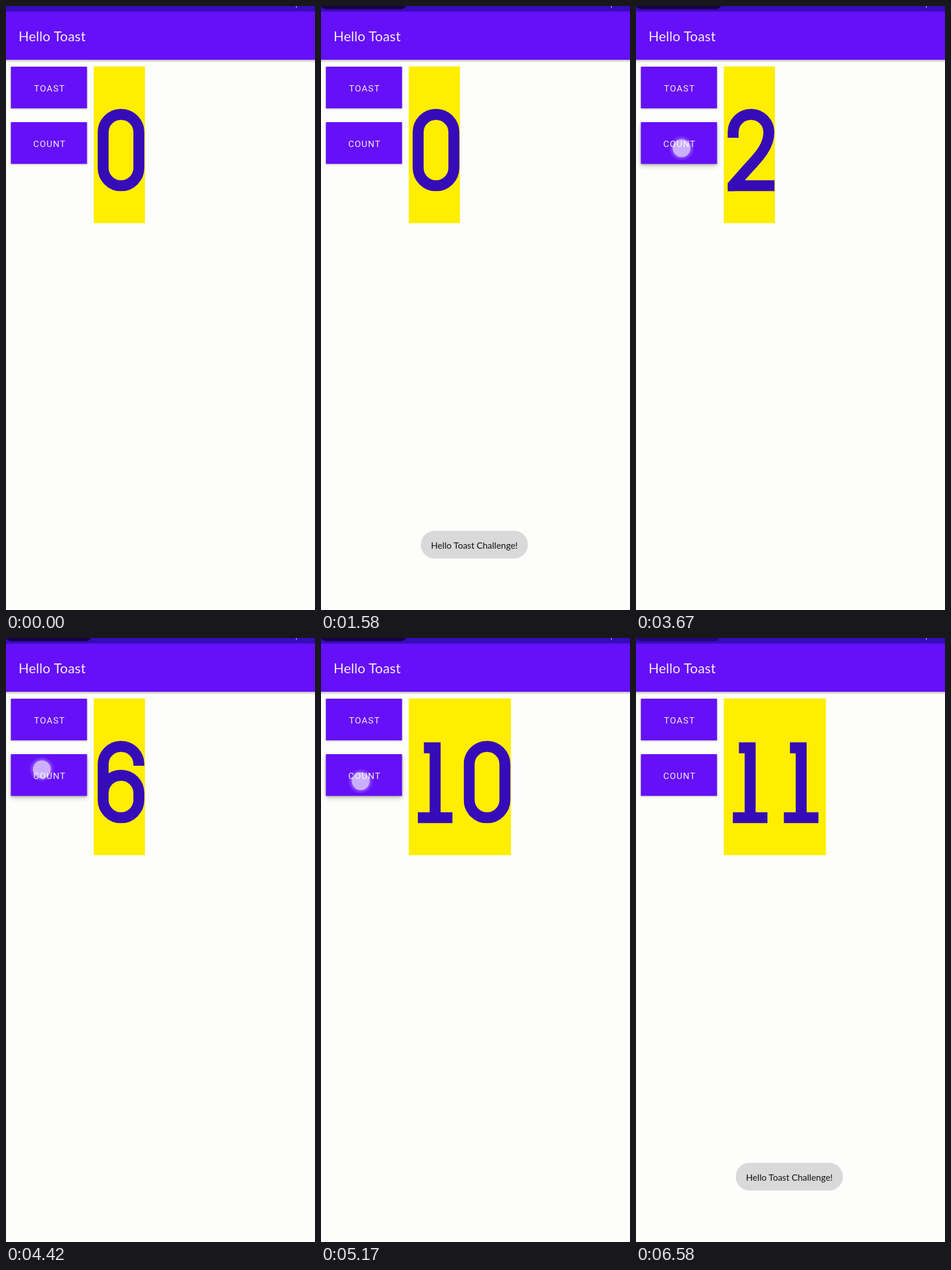
An HTML page that plays this animation: 536x1045 px, repeating every 6.66 s.

```html
<!DOCTYPE html>
<html lang="en">
<head>
<meta charset="utf-8">
<title>Hello Toast</title>
<style>
html, body { margin: 0; height: 100%; overflow: hidden; background: #fdfdfc; }
svg { display: block; width: 100vw; height: 100vh; }
text { font-family: Lato, "Open Sans", sans-serif; text-anchor: middle; fill: #f3eeff; }
.label { font: 15.5px Roboto, sans-serif; letter-spacing: 1.2px; }
.digit { fill: none; stroke: #360bb8; stroke-width: 19; stroke-linejoin: miter; }
</style>
</head>
<body>
<svg viewBox="0 0 536 1045" preserveAspectRatio="none">
  <defs>
    <filter id="soft" x="-20%" y="-30%" width="140%" height="160%"><feGaussianBlur stdDeviation="1.5"/></filter>
    <filter id="deep" x="-20%" y="-40%" width="140%" height="180%"><feGaussianBlur stdDeviation="4"/></filter>
    <linearGradient id="edge" x2="0" y2="1">
      <stop stop-opacity=".24"/><stop offset="1" stop-opacity="0"/>
    </linearGradient>
    <radialGradient id="glow">
      <stop offset=".65" stop-color="#fff" stop-opacity=".3"/>
      <stop offset="1" stop-color="#fff" stop-opacity="0"/>
    </radialGradient>
    <clipPath id="cell"><path d="M6.5 178H88V320.5H6.5z"/></clipPath>
  </defs>

  <rect y="93" width="536" height="5" fill="url(#edge)"/>
  <rect width="536" height="93" fill="#6510f8"/>
  <rect width="536" height="9.5" fill="#360bb8"/>
  <rect x="503" width="1.3" height="3" fill="#c9b8f0"/>
  <rect id="chip" y="-20" height="25.5" rx="9" fill="#130044"/>
  <text x="80" y="61" font-size="23.5" letter-spacing=".2">Hello Toast</text>

  <g id="buttons"></g>

  <rect id="panel" x="152.2" y="104.5" height="271.2" fill="#ffee00"/>
  <g id="count" role="img"></g>

  <g id="toast">
    <rect x="173" y="908" width="186" height="48" rx="24" fill="#d9d9d9"/>
    <text x="266" y="938.5" font-size="15.5" style="fill:#111">Hello Toast Challenge!</text>
  </g>

  <g id="touch">
    <circle r="22" fill="url(#glow)"/>
    <circle r="15.5" fill="#fff" fill-opacity=".52"/>
  </g>
</svg>
<script>
const LOOP = 6660, STEP = 83.25, CELL = 88.5;
const $ = id => document.getElementById(id);
const ramp = (t, a, b) => Math.min(1, Math.max(0, (t - a) / (b - a)));
const pulse = (t, a, b, c, d) => ramp(t, a, b) * (1 - ramp(t, c, d));

// Centre lines of the numerals inside one cell
const SIX = "M78 221V218.5A31 31 0 0 0 16 218.5V280A31 31 0 0 0 78 280V268.5A31 31 0 0 0 16 268.5";
const DIGITS = [
  "M16 218.5A31 31 0 0 1 78 218.5V280A31 31 0 0 1 16 280Z",
  "M26 190H45.5V311M15.5 311H75.5",
  "M16 228V218.5A31 31 0 0 1 78 218.5C78 246 55 266 40 283L0 328M20 311H88",
  "M16 221V218.5A31 31 0 0 1 78 218.5C78 236 66 246 47 246H36M47 246C66 246 78 258 78 276V280A31 31 0 0 1 16 280V277",
  "M50 175L17 281H88M64 240V321",
  "M83 190H22V250C28 238 37 234 47 234A31 31 0 0 1 78 265V280A31 31 0 0 1 16 280V277",
  SIX,
  "M6 190H77L35 325",
  "M47 246C29 246 19 234 19 217A28 29.5 0 0 1 75 217C75 234 65 246 47 246C28 246 16 259 16 280A31 31 0 0 0 78 280C78 259 66 246 47 246Z",
  SIX
];

function digit(n, i) {
  const turn = n === "9" ? "rotate(180 47 249.25)" : "";
  return `<g transform="translate(${152.5 + i * CELL})" clip-path="url(#cell)">
    <path class="digit" d="${DIGITS[n]}" transform="${turn}"/></g>`;
}

function button(label, y) {
  const box = (dy, style) => `<rect x="8.5" y="${y + dy}" width="132" height="72" ${style}/>`;
  return box(4, `id="lift${label}" opacity="0" filter="url(#deep)"`) +
    box(1.2, 'opacity=".3" filter="url(#soft)"') +
    box(0, 'fill="#6510f8"') +
    `<text class="label" x="75.6" y="${y + 43}">${label}</text>`;
}
$("buttons").innerHTML = button("TOAST", 105) + button("COUNT", 201);

// Moment at which the counter reaches n
const reached = n => n === 1 ? 3300 : 3560 + 187.5 * (n - 2);

const taps = [[1160, 1340], [3040, 3200], [3380, 3520], [5570, 5750]];
for (let n = 2; n < 11; n++) taps.push([reached(n) + 60, reached(n + 1) - 10]);

// Finger path: time, x, y
const path = [[1160, 78, 146], [1340, 78, 146], [3080, 89, 241], [3670, 79, 246],
  [4420, 62, 227], [5170, 69, 248], [5570, 76, 146], [5750, 76, 146]];

function finger(t) {
  const i = Math.max(1, path.findIndex(p => p[0] >= t));
  const [a, x, y] = path[i - 1], [b, u, v] = path[i], k = ramp(t, a, b);
  return [x + (u - x) * k, y + (v - y) * k];
}

let shown = -1;
function showCount(n) {
  if (n === shown) return;
  shown = n;
  const digits = [...String(n)];
  $("count").innerHTML = digits.map(digit).join("");
  $("count").setAttribute("aria-label", n);
  $("panel").setAttribute("width", digits.length * CELL + 0.3);
}

function draw(now) {
  const t = Math.floor((now % LOOP + 3) / STEP) * STEP % LOOP;

  let n = 0;
  while (n < 11 && t >= reached(n + 1)) n++;
  showCount(n);

  const touching = taps.some(([a, b]) => t >= a && t < b);
  $("touch").setAttribute("opacity", touching ? 1 : 0);
  $("touch").setAttribute("transform", `translate(${finger(t)})`);

  $("liftTOAST").setAttribute("opacity", .2 *
    (pulse(t, 1220, 1350, 1400, 1570) + pulse(t, 5620, 5760, 5830, 6000)));
  $("liftCOUNT").setAttribute("opacity", .2 * pulse(t, 3150, 3350, 5400, 5600));

  $("toast").setAttribute("opacity",
    pulse(t, 1400, 1580, 3400, 3640) + ramp(t, 5800, 6080));

  $("chip").setAttribute("opacity", pulse(t, 20, 240, 6420, 6740));
  $("chip").setAttribute("width", 148 - 3 * ramp(t, 6420, 6576));
  requestAnimationFrame(draw);
}
requestAnimationFrame(draw);
</script>
</body>
</html>
```
